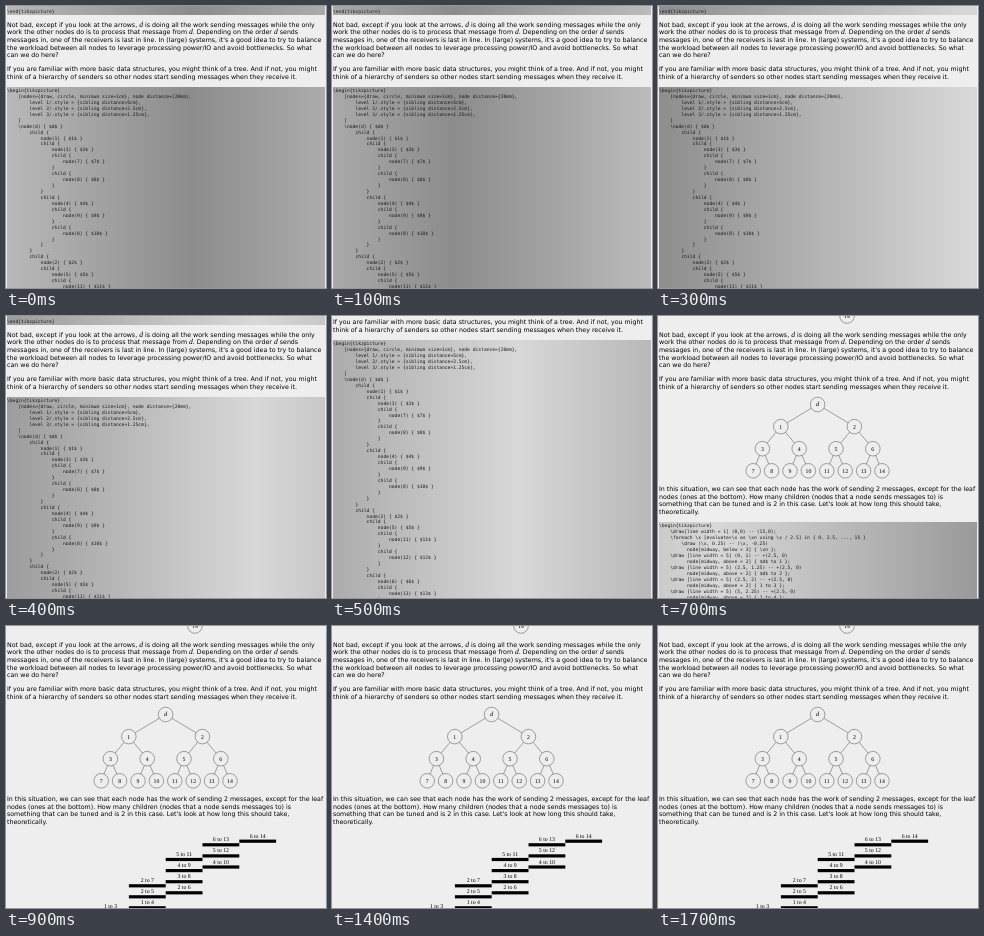
These frames come from a looping animation (320x282 px, 1.8 s). An HTML page:

```html
<!DOCTYPE html>
<html lang="en">
<head>
<meta charset="utf-8">
<title>Diagrams rendering in a page</title>
<style>
html, body { margin: 0; width: 100%; height: 100%; overflow: hidden; background: #eee; }
#stage { position: relative; width: 320px; height: 282px; overflow: hidden; background: #eee; }
.scene { position: absolute; inset: 0; visibility: hidden; animation: 1800ms step-end infinite; }
#code { animation-name: code; }
#shifted { animation-name: shifted; }
#tree { animation-name: tree; }
#chart { animation-name: chart; }
@keyframes code { 0% { visibility: visible; } 27.7% { visibility: hidden; } }
@keyframes shifted { 27.7% { visibility: visible; } 38.8% { visibility: hidden; } }
@keyframes tree { 38.8% { visibility: visible; } 49.9% { visibility: hidden; } }
@keyframes chart { 49.9% { visibility: visible; } 100% { visibility: visible; } }
/* The shimmer is twice as wide as the block and passes once a second */
.shade {
  position: absolute; left: 1px; width: 318px;
  background: linear-gradient(90deg, #8c8c8c, #d8d8d8 50%, #8c8c8c) 0 0 / 636px 100%;
  animation: shimmer 1800ms steps(18) infinite;
}
@keyframes shimmer { from { background-position-x: 185px; } to { background-position-x: -959.8px; } }
svg { position: absolute; left: 0; top: 0; width: 320px; height: 282px; overflow: hidden; }
text { text-rendering: geometricPrecision; fill: #000; white-space: pre; }
.prose { font: 6.29px "DejaVu Sans", sans-serif; }
.math { font: italic 7.6px "Liberation Serif", serif; }
.mono { font: 4.65px "DejaVu Sans Mono", monospace; fill: #1a1a1a; }
.label { font: 5.8px "Liberation Serif", serif; text-anchor: middle; }
.var { font-style: italic; font-size: 6.4px; }
circle, line { fill: none; stroke: #222; stroke-width: .4; }
</style>
</head>
<body>
<div id="stage"></div>
<script>
const stage = document.getElementById('stage');
const LINE = 7.64, PARA = 13.93, CODE_GAP = 13.2, CODE_LINE = 5.94;

const intro = [
  'Not bad, except if you look at the arrows, *d* is doing all the work sending messages while the only',
  'work the other nodes do is to process that message from *d*. Depending on the order *d* sends',
  "messages in, one of the receivers is last in line. In (large) systems, it's a good idea to try to balance",
  'the workload between all nodes to leverage processing power/IO and avoid bottlenecks. So what',
  'can we do here?'
];
const hint = [
  'If you are familiar with more basic data structures, you might think of a tree. And if not, you might',
  'think of a hierarchy of senders so other nodes start sending messages when they receive it.'
];
const result = [
  'In this situation, we can see that each node has the work of sending 2 messages, except for the leaf',
  'nodes (ones at the bottom). How many children (nodes that a node sends messages to) is',
  "something that can be tuned and is 2 in this case. Let's look at how long this should take,",
  'theoretically.'
];

const text = (x, y, s, cls) => `<text x="${x}" y="${y}" class="${cls}">${s}</text>`;
const italics = s => s.replace(/\*(\w)\*/g, '<tspan class="math">$1</tspan>');
const prose = (lines, y) =>
  lines.map((s, i) => text(1, y + i * LINE, italics(s), 'prose')).join('');
const mono = (lines, y) => lines.map((s, i) => {
  const body = s.trimStart();
  return text(1 + (s.length - body.length) * 2.8, y + i * CODE_LINE, body, 'mono');
}).join('');
const label = (x, y, s) => text(x, y, s, s === 'd' ? 'label var' : 'label');
const shade = (top, bottom) => `<div class="shade" style="top:${top}px;height:${bottom - top}px"></div>`;

function scene(id, art, shades = '') {
  stage.insertAdjacentHTML('beforeend',
    `<div class="scene" id="${id}">${shades}<svg viewBox="0 0 320 282">${art}</svg></div>`);
}

// Nested "child { node ... }" listing of the binary tree
function child(depth, n) {
  const pad = ' '.repeat(4 * depth);
  const name = n === 10 ? 8 : n;
  return [
    pad + 'child {',
    `${pad}    node(${name}) { $${n}$ }`,
    ...(n < 7 ? [...child(depth + 1, 2 * n + 1), ...child(depth + 1, 2 * n + 2)] : []),
    pad + '}'
  ];
}
const treeCode = [
  '\\begin{tikzpicture}',
  '    [nodes={draw, circle, minimum size=1cm}, node distance={20mm},',
  ...['5', '2.5', '1.25'].map((d, i) => `        level ${i + 1}/.style = {sibling distance=${d}cm},`),
  '    ]',
  '    \\node(d) { $d$ }',
  ...child(2, 1), ...child(2, 2)
];

const bar = (x, y, s) => [
  `    \\draw [line width = 5] (${x}, ${y}) -- +(2.5, 0)`,
  `          node[midway, above = 2] { ${s} };`
];
const chartCode = [
  '\\begin{tikzpicture}',
  '    \\draw[line width = 1] (0,0) -- (15,0);',
  '    \\foreach \\x [evaluate=\\x as \\xn using \\x / 2.5] in { 0, 2.5, ..., 15 }',
  '        \\draw (\\x, 0.25) -- (\\x, -0.25)',
  '          node[midway, below = 3] { \\xn };',
  ...bar('0', '1', '$d$ to 1'), ...bar('2.5', '1.25', '$d$ to 2'),
  ...bar('2.5', '2', '1 to 3'), ...bar('5', '2.25', '1 to 4')
];

const R = 7.3;
const node = (x, y, s) => `<circle cx="${x}" cy="${y}" r="${R}"/>` + label(x, y + 1.9, s);
function edge(x, y, u, v) {
  const len = Math.hypot(u - x, v - y), dx = (u - x) * R / len, dy = (v - y) * R / len;
  return `<line x1="${x + dx}" y1="${y + dy}" x2="${u - dx}" y2="${v - dy}"/>`;
}
function subtree(n, x, y, gap) {
  let out = node(x, y, n ? String(n) : 'd');
  if (n < 7) [-1, 1].forEach((side, i) => {
    const cx = x + side * gap / 2, cy = y + 22.1;
    out += edge(x, y, cx, cy) + subtree(2 * n + 1 + i, cx, cy, gap / 2);
  });
  return out;
}

// Each row: bar left edge, bar centre, sending node, receiving node
const bars = [
  [233.3, 215.2, 6, 14],
  [196.5, 218.8, 6, 13], [196.5, 229.9, 5, 12], [196.5, 241, 4, 10],
  [159.7, 233.5, 5, 11], [159.7, 244.6, 4, 9], [159.7, 255.7, 3, 8], [159.7, 266.8, 2, 6],
  [122.9, 259.8, 2, 7], [122.9, 270.8, 2, 5], [122.9, 281.8, 1, 4],
  [86.1, 285.4, 1, 3]
];
const chart = bars.map(([x, y, from, to]) =>
  `<rect x="${x}" y="${y - 1.6}" width="36.8" height="3.2"/>` +
  label(x + 18.4, y - 3.5, `${from} to ${to}`)).join('');

// Baselines follow the page flow
const introY = 20.7, hintY = introY + 4 * LINE + PARA, resultY = 175.2, shiftedY = 8.4;
const codeAfter = (y, lines) => y + (lines.length - 1) * LINE + CODE_GAP;
const treeCodeY = codeAfter(hintY, hint);
const shiftedCodeY = codeAfter(shiftedY, hint);
const chartCodeY = codeAfter(resultY, result);

const lead = prose(intro, introY) + prose(hint, hintY);
const page = node(189, 0, '14') + lead + subtree(0, 159.6, 88.5, 73.6) + prose(result, resultY);

scene('code', text(1, 7, '\\end{tikzpicture}', 'mono') + lead + mono(treeCode, treeCodeY),
  shade(0, 9) + shade(treeCodeY - 5, 282));
scene('shifted', prose(hint, shiftedY) + mono(treeCode, shiftedCodeY), shade(shiftedCodeY - 5, 282));
scene('tree', page + mono(chartCode, chartCodeY), shade(chartCodeY - 5, 282));
scene('chart', page + chart);
</script>
</body>
</html>
```
